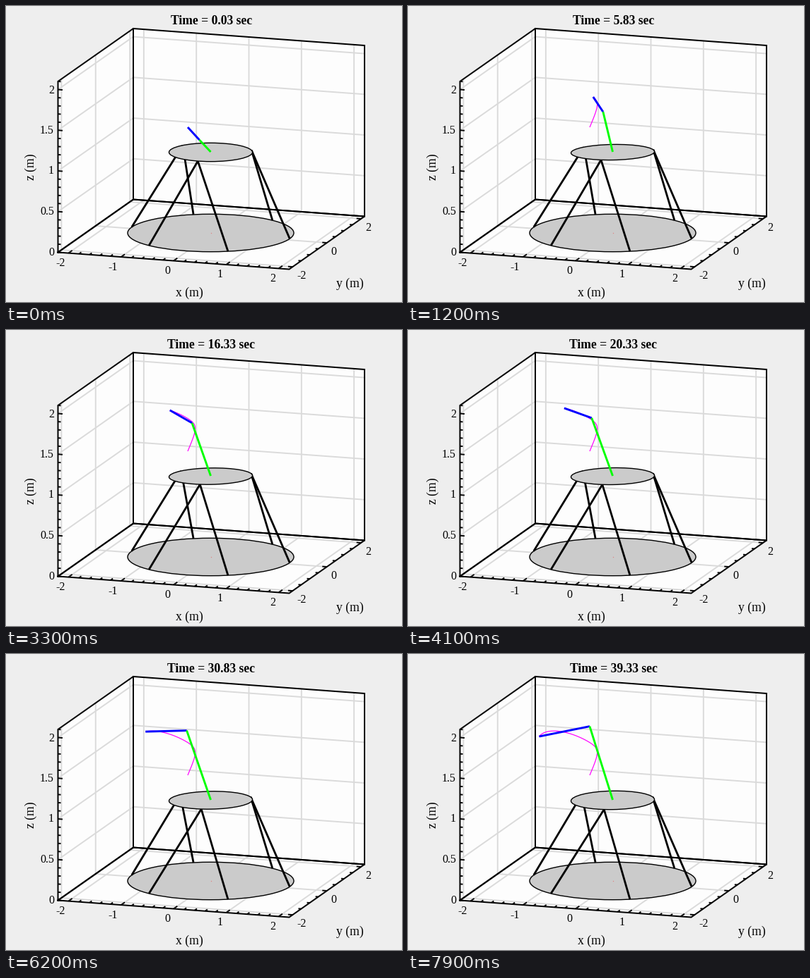
Animation of 560 by 420 pixels, one loop 8 s. Source, as a matplotlib script:

```python
import numpy as np
import matplotlib.pyplot as plt
from matplotlib.animation import FuncAnimation
from matplotlib.patches import Ellipse, Polygon

W, H, DPI = 560, 420, 100
FRAMES, INTERVAL = 80, 100
PX = 72 / DPI
plt.rcParams["font.family"] = "Liberation Serif"

fig = plt.figure(figsize=(W / DPI, H / DPI), dpi=DPI, facecolor="#eeeeee")
ax = fig.add_axes([0, 0, 1, 1])
ax.set_xlim(0.5, W + 0.5)
ax.set_ylim(H, 0)
ax.axis("off")

# Screen projection of the plot box
ORIGIN = np.array([74, 349.5])
EX = np.array([327, 24]) / 4.4
EY = np.array([106.5, -75]) / 4.4
EZ = np.array([0, -242.5]) / 2.1
LO, HI, TOP = -2.2, 2.2, 2.1


def proj(x, y, z):
    return ORIGIN + (x - LO) * EX + (y - LO) * EY + z * EZ


def line(points, width, color="black", z=2, cap="butt"):
    xy = np.array(points)
    return ax.plot(xy[:, 0], xy[:, 1], color=color, lw=width * PX, zorder=z,
                   solid_capstyle=cap, solid_joinstyle="miter")[0]


def label(x, y, s, size=16, ha="center", **kw):
    return ax.text(x, y, s, fontsize=size * PX, ha=ha, va="baseline", **kw)


def tick(p, direction, major):
    length = 6.5 if major else 4
    line([p, p + length * direction / np.hypot(*direction)], 1.9)


def draw_box():
    a, b = proj(LO, LO, 0), proj(LO, HI, 0)
    c, d = proj(HI, HI, 0), proj(HI, LO, 0)
    up = TOP * EZ
    faces = [(a, b, b + up, a + up), (b, c, c + up, b + up), (a, b, c, d)]
    for face in faces:
        ax.add_patch(Polygon(face, fc="#fdfdfd", ec="none", zorder=0))

    grid = dict(width=1.9, color="#dadada", z=1)
    for x in range(-2, 3):
        line([proj(x, LO, 0), proj(x, HI, 0), proj(x, HI, TOP)], **grid)
    for y in (-2, 0, 2):
        line([proj(HI, y, 0), proj(LO, y, 0), proj(LO, y, TOP)], **grid)
    for z in (0.5, 1, 1.5, 2):
        line([proj(LO, LO, z), proj(LO, HI, z), proj(HI, HI, z)], **grid)

    for face in faces:
        line([*face, face[0]], 2, cap="projecting")


def draw_ticks():
    for k in range(-10, 11):
        tick(proj(k / 5, LO, 0), EY, k % 5 == 0)
    for k in range(-4, 5):
        tick(proj(HI, k / 2, 0), -EX, k % 4 == 0)
    for k in range(22):
        tick(proj(LO, LO, k / 10), EX, k % 5 == 0)

    for x in range(-2, 3):
        px, py = proj(x, LO, 0)
        label(px - 4.6, py + 18.5, str(x), ha="right")
    for y in (-2, 0, 2):
        px, py = proj(HI, y, 0)
        label(px + 5.8, py + 17, str(y), ha="left")
    for z in (0, 0.5, 1, 1.5, 2):
        label(68.5, 353.5 - 115 * z, f"{z:g}", ha="right")
    label(259.5, 411.5, "x (m)", 17.6)
    label(486.5, 399, "y (m)", 17.6)
    label(40.5, 228.5, "z (m)", 17.6, rotation=90, rotation_mode="anchor")


def settle(drift, start, tau):
    """Slow drift plus a start-up error that dies away."""
    error = np.array(start) - drift(0)

    def at(n):
        return drift(n) + error * np.exp(-n / np.array(tau))
    return at


def tip_drift(n):
    return np.array([281 - 1.5 * n + 7.8e-5 * (n - 12) ** 3,
                     109.2 + 0.0116 * (n - 53) ** 2])


def elbow_drift(n):
    return np.array([256 + 0.0074 * (n - 65) ** 2,
                     127.5 + 25 * np.cos(np.pi * (n + 6) / 88)])


tip_at = settle(tip_drift, (257.5, 172), (3.4, 2.6))
elbow_at = settle(elbow_drift, (274, 190), (3.5, 4.5))


def plate_at(n):
    """Half height, tilt and yaw (degrees) of the upper platform."""
    u, e = n / (FRAMES - 1), np.exp(-n / 3)
    return 10.6 + 2.6 * (u + e), e - 1, e - 1 - 5 * u


def rim(center, rx, ry, angle, tilt=0):
    a = np.radians(angle)
    dx = rx * np.cos(a)
    return center + np.array([dx, ry * np.sin(a) + dx * np.radians(tilt)])


BASE, BASE_RX, BASE_RY = np.array([290, 322]), 117.5, 26.7
PLATE, PLATE_RX = np.array([290, 207.5]), 59

draw_box()
draw_ticks()
disc = dict(fc="#cbcbcb", ec="black", lw=1.4 * PX)
ax.add_patch(Ellipse(BASE, 2 * BASE_RX, 2 * BASE_RY, zorder=3, **disc))
ax.plot(*BASE, "s", color="#e08080", ms=1.2 * PX, mew=0, zorder=4)
plate = ax.add_patch(Ellipse(PLATE, 2 * PLATE_RX, 26, zorder=6, **disc))

feet = [rim(BASE, BASE_RX, BASE_RY, 18 + 60 * k) for k in range(6)]
legs = [line([foot, foot], 2.8, z=5) for foot in feet]
trace = line([(0, 0)], 1.2, "#ff00ff", 7)
lower = line([(0, 0)], 2.9, "#00ff00", 9)
upper = line([(0, 0)], 2.9, "#0000ff", 8)
title = label(291, 25.5, "", 17.6, weight="bold")


def set_line(artist, *points):
    artist.set_data(*np.array(points).T)


def update(n):
    title.set_text(f"Time = {max(0.03, 0.5 * n - 0.17):.2f} sec")
    ry, tilt, yaw = plate_at(n)
    plate.set_height(2 * ry)
    plate.set_angle(tilt)

    # Neighbouring feet share one of three joints
    for k, (leg, foot) in enumerate(zip(legs, feet)):
        angle = -12 + 120 * ((k + 1) // 2) + yaw
        set_line(leg, foot, rim(PLATE, PLATE_RX, ry, angle, tilt))

    tip, elbow = tip_at(n), elbow_at(n)
    set_line(lower, (290, 207), elbow)
    set_line(upper, elbow, tip)
    set_line(trace, *[tip_at(s) for s in np.linspace(0, n, 4 * n + 2)])
    return []


anim = FuncAnimation(fig, update, frames=FRAMES, interval=INTERVAL,
                     init_func=lambda: update(0), repeat=True, repeat_delay=0)
plt.show()
```
